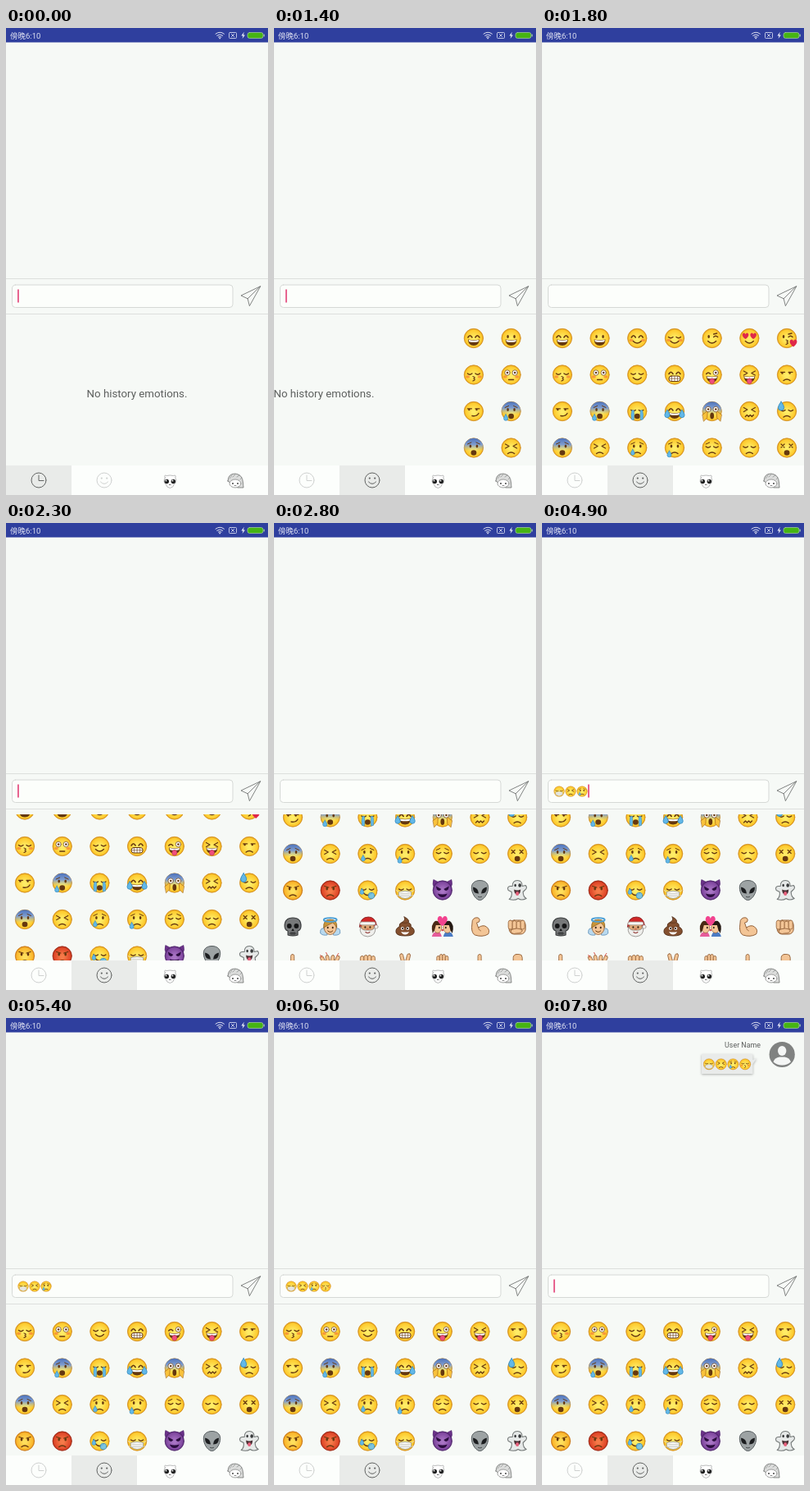
Write an HTML page with a canvas that moves like this. It is 320 px wide and 569 px high and loops after 8000 ms.

```html
<!DOCTYPE html>
<html lang="en">
<head>
<meta charset="utf-8">
<title>Emotion keyboard</title>
<style>
html, body { margin: 0; width: 100%; height: 100%; overflow: hidden; background: #f6f9f6; }
canvas { display: block; width: 320px; height: 569px; }
</style>
</head>
<body>
<canvas id="stage"></canvas>
<script>
const W = 320, H = 569, LOOP = 8000, STEP = 100;
const canvas = document.getElementById('stage');
const dpr = window.devicePixelRatio || 1;
canvas.width = W * dpr;
canvas.height = H * dpr;
const c = canvas.getContext('2d');
c.lineCap = c.lineJoin = 'round';

const BROWN = '#65380f', SKIN = '#f3c596', EDGE = '#94623a', BLUE = '#62b8e8';

// ---- drawing helpers ----
function paint(p, fill, stroke, w = 1) {
  if (fill) { c.fillStyle = fill; c.fill(p); }
  if (stroke) { c.strokeStyle = stroke; c.lineWidth = w; c.stroke(p); }
}
const path = (d, fill, stroke, w) => paint(new Path2D(d), fill, stroke, w);
const ink = (d, w = 1.4, col = BROWN) => path(d, null, col, w);
function oval(x, y, rx, ry, fill, stroke, w) {
  const p = new Path2D();
  p.ellipse(x, y, rx, ry, 0, 0, Math.PI * 2);
  paint(p, fill, stroke, w);
}
function box(x, y, w, h, r, fill, stroke, lw) {
  const p = new Path2D();
  p.roundRect(x, y, w, h, r);
  paint(p, fill, stroke, lw);
}
function at(x, y, s, draw) {
  c.save();
  c.translate(x, y);
  c.scale(s, s);
  draw();
  c.restore();
}
function label(str, x, y, size, color, align) {
  c.font = `${size}px Roboto, "Noto Sans CJK SC", "Noto Sans CJK JP", sans-serif`;
  c.fillStyle = color;
  c.textAlign = align;
  c.textBaseline = 'alphabetic';
  c.fillText(str, x, y);
}
const heart = (x, y, s, col = '#e02848') => at(x, y, s, () =>
  path('M0 4C-6 0-4-4-2-4Q-.5-4 0-2Q.5-4 2-4C4-4 6 0 0 4Z', col));
const drop = (x, y, s = 1) => at(x, y, s, () =>
  path('M0-4Q3 0 3 2A3 3 0 0 1-3 2Q-3 0 0-4Z', BLUE, '#2f86bd', .7));
const pair = draw => { draw(-1); draw(1); };

// ---- emoji parts, drawn in a 24 unit disc ----
const wideEye = x => {
  oval(x, -2.5, 3.2, 3.2, '#fff', BROWN, .7);
  oval(x, -2.5, 1.3, 1.3, BROWN);
};
const open = () => {
  path('M-7 1.5Q0 3 7 1.5Q6.5 9 0 9Q-6.5 9-7 1.5Z', BROWN);
  path('M-6.2 2Q0 3.5 6.2 2L5.6 4.3Q0 5.4-5.6 4.3Z', '#fff');
};
const dot = x => oval(x, -2, 1.3, 2, BROWN);
const part = {
  dot: () => pair(s => dot(s * 4)),
  arc: () => ink('M-7-1Q-4.5-5.5-2-1M2-1Q4.5-5.5 7-1', 1.6),
  shut: () => ink('M-7.5-1.5Q-4.8 1-2-1.5M2-1.5Q4.8 1 7.5-1.5'),
  wink: () => { dot(-4); ink('M2-1.5Q4.5-4 7-1.5M2-5L6-6'); },
  wide: () => pair(s => wideEye(s * 4.6)),
  love: () => pair(s => heart(s * 4.8, -2.8, .95)),
  crazy: () => { ink('M-7-1Q-4.5-4-2-1', 1.6); wideEye(4.6); },
  squint: () => ink('M-7-4.5L-2.5-2L-7 .5M7-4.5L2.5-2L7 .5', 1.3),
  side: () => {
    ink('M-7.5-3.2H-2.5M2-3.2H7', 1.2);
    pair(s => oval(s * 4.6 - 1, -2, 1.2, 1.3, BROWN));
  },
  cross: () => ink('M-7-4.5l4 4m0-4l-4 4M3-4.5l4 4m0-4l-4 4', 1.2),
  grin: open,
  smile: () => ink('M-5 3.5Q0 8.5 5 3.5'),
  smirk: () => ink('M-2 5.5Q4 6.5 6 2.5'),
  flat: () => ink('M-3 6H3'),
  frown: () => ink('M-4 7Q0 4 4 7', 1.5),
  kiss: () => ink('M-1 2Q3 3 0 4.5Q3 6-1 7.5', 1.2),
  teeth: () => {
    box(-7, 1.5, 14, 6.5, 3, '#fff', BROWN, 1);
    ink('M-6.5 4.7H6.5M-3.5 2V7.5M0 2V7.5M3.5 2V7.5', .6);
  },
  tongue: () => { open(); box(-3, 4.5, 6, 6.5, 3, '#ef4f7c', '#b82c55', .6); },
  wavy: () => ink('M-5 6.5l2-2 2 2 2-2 2 2 2-2'),
  bawl: () => oval(0, 6, 3.4, 3.2, BROWN),
  scream: () => oval(0, 5.5, 2.4, 4, BROWN),
  blush: () => pair(s => oval(s * 7.2, 2.4, 2.5, 1.7, 'rgba(240,80,50,.45)')),
  sad: () => ink('M-7.5-4.5L-3-6.5M7.5-4.5L3-6.5', 1),
  mad: () => ink('M-7-5L-2-3.5M7-5L2-3.5', 1.3),
  tear: () => drop(-5.5, 5, .8),
  drip: () => drop(-6.5, 7, .85),
  tears: () => pair(s => path(`M${s * 6.5}-1Q${s * 8} 4 ${s * 7} 10L${s * 4} 10.5Q${s * 3.5} 4 ${s * 4}-1Z`, BLUE, '#2f86bd', .5)),
  joy: () => pair(s => drop(s * 9, 2.5, 1.05)),
  sweat: () => drop(-7, -7, 1.2),
  snore: () => { drop(-7, 1, .8); oval(4.5, 6.5, 3.8, 3.8, 'rgba(110,195,240,.9)', '#2c84c0', .7); },
  // A cold forehead that fades into the face.
  blue: () => {
    const g = c.createLinearGradient(0, -12, 0, 4);
    g.addColorStop(0, '#4c70b8');
    g.addColorStop(.5, '#7d9cd0');
    g.addColorStop(1, 'rgba(180,190,170,0)');
    path('M-11.8 0A11.8 11.8 0 0 1 11.8 0L11 4H-11Z', g);
  },
  hands: () => pair(s => path(`M${s * 10} 12L${s * 6} 8L${s * 5.5} 1Q${s * 7}-1 ${s * 8.5} 2L${s * 11.5} 4Z`, '#f8c23c', '#a86a18', .7)),
  heart: () => heart(8, 6, 1.1),
  mask: () => {
    ink('M-11 0L-7 2.5M11 0L7 2.5M-10.5 6L-7 7M10.5 6L7 7', .8, '#e6e4dc');
    path('M-7.5 2Q0-.5 7.5 2V7Q4 10 0 10Q-4 10-7.5 7Z', '#f6f6f3', '#96968f', .8);
    ink('M-6 4.3H6M-6 6.8H6', .6, '#aaaaa4');
  }
};

const TONE = {
  yellow: ['#ffec66', '#fdca2e', '#d38c18'],
  amber: ['#ffdf5c', '#fab62c', '#c97514'],
  red: ['#f57a48', '#df4628', '#9a2412'],
  purple: ['#a874c4', '#80479f', '#4b2268']
};
function disc(tone) {
  const [a, b, d] = TONE[tone];
  const g = c.createRadialGradient(0, 1, 2, 0, 0, 12);
  g.addColorStop(0, a);
  g.addColorStop(.8, b);
  g.addColorStop(1, d);
  oval(0, 0, 11.7, 11.7, g, d, .7);
}
const smallEyes = y => pair(s => oval(s * 3, y, 1, 1.3, '#3a2413'));
const finger = (x, y, w, h) => box(x, y, w, h, w / 2, SKIN, EDGE, .8);

const figure = {
  devil() {
    pair(s => path(`M${s * 3}-9L${s * 11}-13Q${s * 13}-7 ${s * 10}-3Z`, '#6b3189', '#4b2268', .6));
    disc('purple');
    pair(s => path(`M${s * 8}-5L${s * 1.5}-1.5Q${s * 4} 2 ${s * 7}-1Z`, '#2a0d3e'));
    path('M-6 4Q0 6 6 4Q4 8.5 0 8.5Q-4 8.5-6 4Z', '#2a0d3e');
  },
  alien() {
    path('M0-12C8-12 11-7 10-1C9 6 4 12 0 12C-4 12-9 6-10-1C-11-7-8-12 0-12Z', '#9da3a4', '#555c5e', 1);
    pair(s => path(`M${s * 1.5} 4Q${s * 2}-3 ${s * 8.5}-4Q${s * 9} 4 ${s * 1.5} 4Z`, '#1c1e20'));
    ink('M-2 8Q0 9 2 8', 1, '#44494b');
  },
  ghost() {
    path('M-6-5Q-6-12 0-12Q6-12 6-5L10-6Q13-3 9 0L7 2Q7 8 11 10Q5 13 1 10Q-3 13-10 11Q-6 8-7 2L-11 0Q-13-4-9-5Z', '#e6e9e8', '#747978', 1.1);
    oval(-2.5, -6, 1.3, 1.8, '#3a3c3d');
    oval(3, -6, 1.8, 2.2, '#3a3c3d');
    path('M-4-1Q0 1 4-1Q4 5 0 5Q-4 5-4-1Z', '#4a3034');
    oval(0, 4, 2, 2.6, '#e7607c');
  },
  skull() {
    path('M0-11C8-11 10-6 10-1Q10 4 6 5V10Q0 12-6 10V5Q-10 4-10-1C-10-6-8-11 0-11Z', '#77797a', '#36393a', 1.1);
    pair(s => oval(s * 4.3, -1, 2.9, 3, '#151617'));
    path('M0 2L1.8 5H-1.8Z', '#151617');
    ink('M-4 8H4M-2 6.5V10M0 6.5V10M2 6.5V10', .8, '#222425');
  },
  angel() {
    pair(s => path(`M${s * 5} 3Q${s * 13}-1 ${s * 12} 8Q${s * 9} 11 ${s * 4} 10Z`, '#b9d9ee', '#5c8fb8', .8));
    oval(0, 1, 7.5, 8.5, SKIN, EDGE, .8);
    path('M-8 1Q-9-9 0-9Q9-9 8 1Q6-3 3-5Q-3-2-8 1Z', '#c99538', '#80591c', .7);
    oval(0, -8.5, 8, 2.3, null, '#4a9fd6', 1.8);
    smallEyes(1);
    ink('M-3 5Q0 8 3 5', 1);
  },
  santa() {
    path('M-10 0Q-9-12 1-12Q9-12 11-2L8 0Z', '#cf2828', '#7e1616', .8);
    oval(0, 1, 8, 7, '#dfa877', EDGE, .6);
    path('M-9 0Q-7 5 0 4Q7 5 9 0Q11 11 0 12Q-11 11-9 0Z', '#efefec', '#8c8884', .8);
    box(-9.5, -6, 19, 3.8, 1.9, '#f7f7f4', '#98948f', .7);
    oval(10.5, 0, 2.2, 2.2, '#f7f7f4', '#98948f', .7);
    smallEyes(.5);
    oval(0, 2.7, 1.6, 1.2, '#d17656');
    ink('M-2.5 6.5Q0 8.5 2.5 6.5', 1.1, '#8d302c');
  },
  poo() {
    path('M-1-12Q6-9 4-5Q8-4 7 0Q12 2 11 7Q10 11 0 11Q-10 11-11 7Q-12 2-7 0Q-8-4-3-6Q1-8-1-12Z', '#84502f', '#4f2c17', .9);
    ink('M-6 0Q1 2 6-1M-4-5Q1-4 3-5', .8, '#5d351c');
    pair(s => { oval(s * 3.2, 2, 1.9, 2.1, '#fff'); oval(s * 3, 2, .9, 1.2, '#20140c'); });
    path('M-5 6Q0 7 5 6Q3 9.5 0 9.5Q-3 9.5-5 6Z', '#fff');
  },
  couple() {
    pair(s => {
      path(`M${s * 13} 12Q${s * 12} 6 ${s * 6} 6Q${s * 2} 6 ${s * 1} 12Z`, s < 0 ? '#e65c9a' : '#4a7bc4');
      oval(s * 6, 1, 5, 6.5, SKIN, EDGE, .7);
      path(`M${s * 2}-2Q${s * 4}-8 ${s * 9}-7Q${s * 15}-3 ${s * 12} 8Q${s * 9} 4 ${s * 8}-2Z`, s < 0 ? '#4a2a15' : '#251a14');
      oval(s * 4, 1, .9, 1.2, '#2d2018');
    });
    heart(0, -7, 1.5, '#f2438f');
    oval(0, 4, 1.4, 1.2, '#d84b50');
  },
  arm() {
    path('M-9-8Q-7-12-2-11Q1-9-1-6L-4-5L-2 1Q4-3 8 0Q13 4 10 9Q3 13-6 10Q-10 8-10 1Z', SKIN, EDGE, 1);
    ink('M-2 1Q-2 4 1 5', .8, EDGE);
  },
  fist() {
    box(-10, -8, 20, 17, 6, SKIN, EDGE, 1);
    for (let i = 0; i < 4; i++) finger(-11 + i * 5, -8 + i % 3 * .5, 5, 11);
    path('M-8 4Q0 0 6 4Q6 8-1 8Q-8 10-8 4Z', SKIN, EDGE, .9);
  },
  point() {
    box(-7, -1, 14, 12, 4, SKIN, EDGE, .9);
    finger(-2.5, -11, 4.2, 14);
  },
  clap() {
    [-7, -2.5, 2, 6].forEach((x, i) => at(x, 0, 1, () => {
      c.rotate(-.45 + i * .3);
      finger(-2, -10, 4, 13);
    }));
    box(-8, -2, 16, 12, 5, SKIN, EDGE, .9);
    ink('M-10-7l-2-3M8-9l2-3M-4-11l-1-2', 1, '#d8463a');
  },
  raised() {
    box(-8, -6, 16, 16, 5, SKIN, EDGE, .9);
    for (let i = 0; i < 4; i++) finger(-9 + i * 4.5, -10 + (i % 3 ? 0 : 1), 4.5, 9);
  },
  peace() {
    pair(s => at(s * 2, 0, 1, () => { c.rotate(s * .25); finger(-2, -12, 4, 14); }));
    box(-6, -1, 12, 12, 4, SKIN, EDGE, .9);
  },
  palm() {
    for (let i = 0; i < 4; i++) finger(-7 + i * 3.5, -9 - (i % 3 ? 2 : 0), 3.5, 14);
    box(-7, -1, 14, 12, 5, SKIN, EDGE, .9);
  },
  down() {
    box(-5, -11, 11, 13, 4, SKIN, EDGE, .9);
    finger(-4, -2, 4.6, 13);
  }
};

function emoji(spec, x, y, s = 1) {
  at(x, y, s, () => {
    if (figure[spec]) return figure[spec]();
    const words = spec.split(' ');
    disc(words.find(w => TONE[w]) || 'yellow');
    words.forEach(w => part[w] && part[w]());
  });
}

const MASK = 'shut mask', PAIN = 'squint frown', CRY = 'dot frown sad tear', PECK = 'shut kiss blush';
const rows = [
  ['arc grin', 'dot grin', 'arc smile blush', 'shut smile blush', 'wink smile', 'love smile', 'wink kiss heart'],
  [PECK, 'wide flat blush', 'shut smile', 'arc teeth', 'crazy tongue', 'squint tongue', 'side frown'],
  ['side smirk', 'blue dot bawl sad drip', 'shut tears bawl', 'arc grin joy', 'blue wide scream hands', 'squint wavy', 'shut frown sweat'],
  ['blue dot bawl sad', PAIN, CRY, 'dot frown sad drip', 'shut frown sad', 'shut frown', 'cross bawl'],
  ['amber dot mad frown', 'red dot mad frown', 'shut smile snore', MASK, 'devil', 'alien', 'ghost'],
  ['skull', 'angel', 'santa', 'poo', 'couple', 'arm', 'fist'],
  ['point', 'clap', 'raised', 'peace', 'palm', 'point', 'down']
];
const typed = [MASK, PAIN, CRY, PECK];

// ---- timeline ----
const clamp = v => Math.max(0, Math.min(1, v));
const tapTimes = [3000, 3900, 4800, 5800];
const blinks = [[0, 500], [1000, 1500], [2000, 2500], [3000, 3400], [3900, 4400], [4800, 5300], [5800, 6400], [6900, LOOP]];
const SEND = 7400;

function pageShift(t) {
  return t < 1400 ? W : W * (1 - clamp((t - 1350) / 700)) ** 5;
}
const scrollKeys = [[2050, 0], [2300, 28.5], [2500, 76], [2650, 101], [2800, 108.5], [5050, 108.5], [5200, 72], [5300, 50], [5400, 40.5]];
function scrollY(t) {
  if (t <= scrollKeys[0][0]) return 0;
  const i = scrollKeys.findIndex(k => t <= k[0]);
  if (i < 0) return scrollKeys.at(-1)[1];
  const [t0, y0] = scrollKeys[i - 1], [t1, y1] = scrollKeys[i];
  return y0 + (y1 - y0) * (t - t0) / (t1 - t0);
}

// ---- screen ----
function statusBar() {
  box(0, 0, W, 17.5, 0, '#2f3f9e');
  label('傍晚6:10', 5, 12.8, 9.5, '#dfe2f2', 'left');
  ink('M256 7.2Q261.2 3.2 266.4 7.2M257.7 9.2Q261.2 6.6 264.7 9.2M259.4 11Q261.2 9.8 263 11', 1, '#dfe2f2');
  oval(261.2, 12.4, .9, .9, '#dfe2f2');
  box(272.5, 5.5, 9, 7, 1, null, '#d0d5ec', .9);
  ink('M275.4 7.4l3.2 3.2m0-3.2l-3.2 3.2', .9, '#d0d5ec');
  path('M290.8 4.8L287.4 9.5H289.5L288.6 13L292 8.4H289.9Z', '#e8eaf6');
  box(295, 5.5, 19, 7, 2.5, '#46b414', '#a9cfa8', .7);
  box(314.6, 7.4, 1.2, 3.2, .5, '#a9cfa8');
}

function inputBar(t) {
  box(0, 305, W, 1, 0, '#dddfdd');
  box(0, 348, W, 1, 0, '#dddfdd');
  box(7.5, 313, 269.5, 27.5, 4, '#fcfefb', '#d6d9d6', 1);
  ink('M310.5 314.8L287 326L295.2 329.8L297.3 338.3ZM310.5 314.8L295.2 329.8', .9, '#747675');
  const n = t < SEND ? tapTimes.filter(k => t >= k).length : 0;
  for (let i = 0; i < n; i++) emoji(typed[i], 21 + 14 * i, 327, .54);
  if (blinks.some(([a, b]) => t >= a && t < b)) box(14.2 + 14 * n, 318.5, 1.5, 16, 0, '#e0306c');
}

function panel(t) {
  const dx = pageShift(t), sy = scrollY(t);
  c.save();
  c.beginPath();
  c.rect(0, 355, W, 178);
  c.clip();
  if (dx > 0) label('No history emotions.', 160 + dx - W, 449.5, 13.3, '#5d5f5e', 'center');
  if (dx < W) rows.forEach((row, r) => {
    const y = 378 + 44.5 * r - sy;
    if (y > 340 && y < 550) row.forEach((spec, i) => emoji(spec, 23 + 45.7 * i + dx, y));
  });
  c.restore();
}

function tabs(t) {
  const on = t < 1400 ? 0 : 1;
  box(0, 533, W, 36, 0, '#fcfefc');
  box(on * 80, 533, 80, 36, 0, '#e9ebe9');
  const tint = i => i === on ? '#626463' : '#cfd1d0';
  oval(40, 551, 9, 9, null, tint(0), 1);
  ink('M40 545V551.5H46', 1, tint(0));
  oval(120, 551, 9, 9, null, tint(1), 1);
  pair(s => oval(120 + s * 3.2, 548.6, 1.1, 1.1, tint(1)));
  ink('M115.5 553Q120 558 124.5 553', 1, tint(1));
  at(200.3, 552, 1, () => {
    path('M-6-4Q-8-8-4-6.5Q0-7.5 4-6.5Q8-8 6.5-4Q9 1 5 4Q4 8 0 8.5Q-4 8-5 4Q-9 1-6-4Z', '#fff', '#9b9d9c', .7);
    pair(s => {
      oval(s * 4, .5, 2.7, 2.7, '#1d1e1e');
      oval(s * 4 - .8, -.5, .9, .9, '#fff');
    });
    ink('M-1 4.5Q0 3.8 1 4.5', .8, '#333');
  });
  at(280, 552, 1, () => {
    path('M-9 0Q-9-9 0-9Q9-8 9.5 2L10 8H3Q-3 5-9 0Z', '#dcdddc', '#6d6f6e', .8);
    ink('M-7-3L-4-7M-3-5L0-8M2-5L5-7M6-2L8-4', .7, '#8c8e8d');
    oval(0, 3, 7, 5, '#fff', '#777978', .7);
    pair(s => oval(s * 3, 3, .9, 1.1, '#333'));
    ink('M-1 5.5H1', .7, '#555');
  });
}

function message(t) {
  if (t < SEND) return;
  c.save();
  c.globalAlpha = clamp((t - SEND + 60) / 260);
  label('User Name', 267, 36.3, 8.9, '#5c5e5d', 'right');
  oval(293.2, 44.5, 15.6, 15.6, '#808281');
  oval(293.2, 40, 5.2, 6, '#f4f6f5');
  path('M282.5 53.5Q284 48.6 290 47.5H296.4Q302.4 48.6 303.9 53.5Q299.5 57.6 293.2 57.6Q286.9 57.6 282.5 53.5Z', '#f4f6f5');
  c.shadowColor = 'rgba(0,0,0,.3)';
  c.shadowBlur = 3 * dpr;
  c.shadowOffsetY = dpr;
  path('M195 44H257.5V51L262.5 48.5L257.5 56V68H195Z', '#e9ebea');
  c.shadowColor = 'transparent';
  typed.forEach((e, i) => emoji(e, 204 + 14.7 * i, 56.3, .57));
  c.restore();
}

function draw(t) {
  c.setTransform(dpr, 0, 0, dpr, 0, 0);
  box(0, 0, W, H, 0, '#f6f9f6');
  message(t);
  statusBar();
  inputBar(t);
  panel(t);
  tabs(t);
}

let last = -1;
const start = performance.now();
function tick() {
  const t = Math.floor((performance.now() - start) % LOOP / STEP) * STEP;
  if (t !== last) draw(last = t);
  requestAnimationFrame(tick);
}
tick();
</script>
</body>
</html>
```
